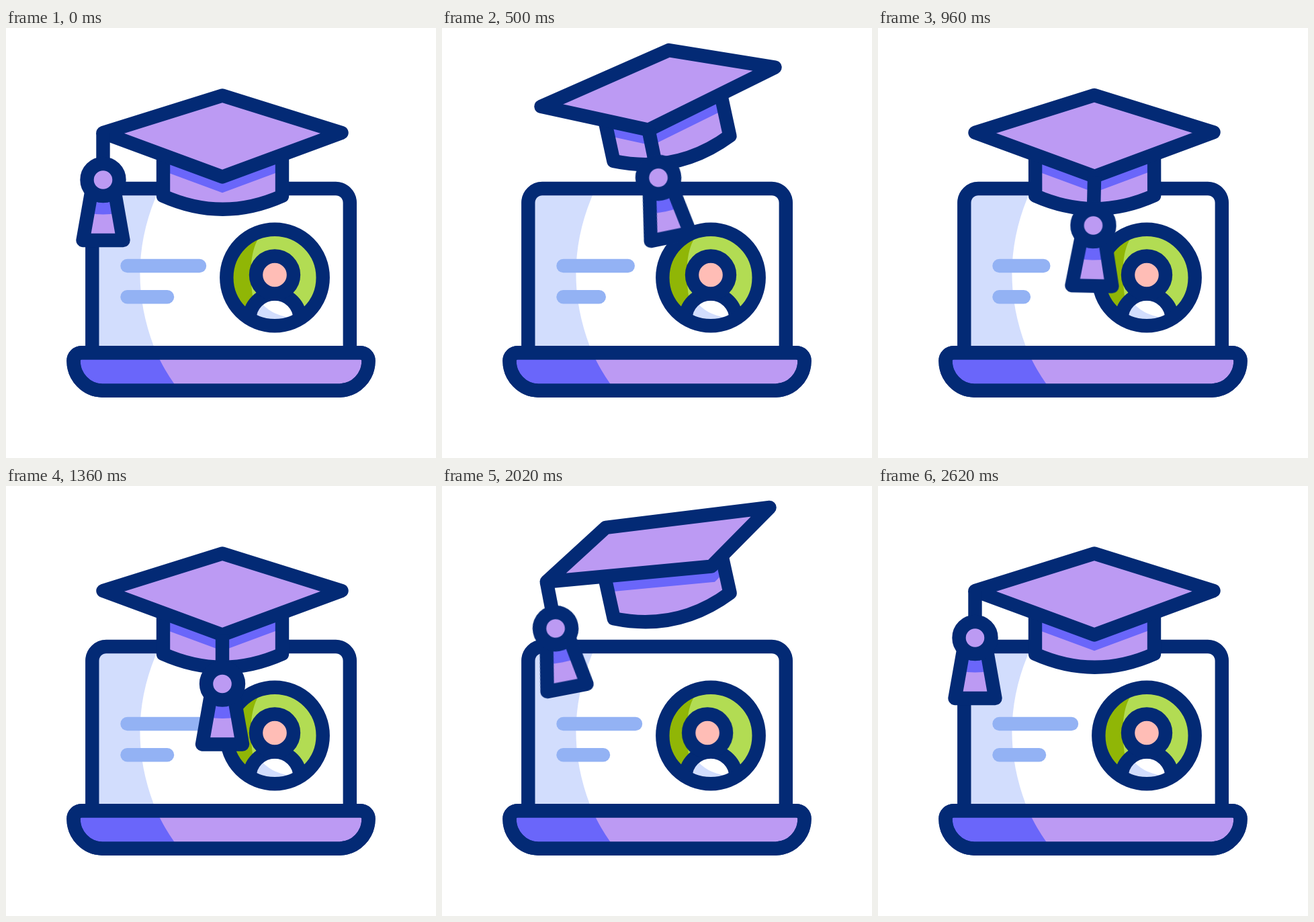
These frames come from a looping animation (640x640 px, 2800 ms). An HTML page:

```html
<!DOCTYPE html>
<html lang="en">
<head>
<meta charset="utf-8">
<title>Online graduation</title>
<style>
  html, body { margin: 0; width: 100%; height: 100%; overflow: hidden; background: #fff; }
  svg { display: block; width: 100vw; height: 100vh; }
  .ink { stroke: #032a75; stroke-width: 20.4; stroke-linejoin: round; }
  .none { fill: none; }
  .lilac { fill: #bc9af3; }
  .violet { fill: #6a66fa; }
  .pale { fill: #d2ddfd; }
  .text, .spark { fill: none; stroke-width: 20.4; stroke-linecap: round; }
  .text { stroke: #93b2f4; stroke-dasharray: 100 300; animation: type 2.8s cubic-bezier(.37, 0, .63, 1) infinite; }
  .spark { stroke: #ffc94f; stroke-dasharray: 100 300; animation: spark 2.8s infinite; }
  .head { animation: shake 2.8s cubic-bezier(.37, 0, .63, 1) infinite; }
  @keyframes type {
    0%, 21.43%, 42.86%, 100% { stroke-dashoffset: 0; }
    10.71%, 32.14% { stroke-dashoffset: 43; }
  }
  @keyframes spark {
    0%, 7.14% { stroke-dashoffset: 100; opacity: 0; }
    7.15% { stroke-dashoffset: 100; opacity: 1; }
    11.43%, 12.86% { stroke-dashoffset: 0; opacity: 1; }
    17.85% { stroke-dashoffset: -100; opacity: 1; }
    17.86%, 100% { stroke-dashoffset: -100; opacity: 0; }
  }
  @keyframes shake {
    0%, 57.86%, 92.86%, 100% { transform: translateX(0); }
    71.43% { transform: translateX(-5px); }
    82.86% { transform: translateX(5px); }
  }
</style>
</head>
<body>
<svg viewBox="0 0 640 640">
  <defs>
    <path id="capBody" d="M-88 15V91.5Q.5 131 89 91.5V15"/>
    <path id="bust" d="M362.5 446V433a37.5 37.5 0 0 1 75 0V446Z"/>
    <clipPath id="inCap"><use href="#capBody"/></clipPath>
    <clipPath id="inBust"><use href="#bust"/></clipPath>
    <clipPath id="inRing"><circle cx="400" cy="371.5" r="72"/></clipPath>
  </defs>

  <!-- laptop -->
  <path class="pale" d="M130 240H228L224 249Q177 360 220 474L224 484H130Z"/>
  <path class="ink none" d="M128.3 483V260a21 21 0 0 1 21-21H490.800a21 21 0 0 1 21 21V483"/>
  <path id="base" class="lilac" d="M112.500 483.300H527.500a12 12 0 0 1 12 12A43.500 44.300 0 0 1 497 539.600H143A43.500 44.300 0 0 1 100.500 495.300a12 12 0 0 1 12-12Z"/>
  <path class="violet" d="M112.500 484H224L229 494Q238 512 250 529L257 539H143A43 44 0 0 1 101 495Z"/>
  <use href="#base" class="ink" style="fill-opacity:0"/>
  <path class="ink none" d="M112.500 483.300H527.500a12 12 0 0 1 12 12A43.500 44.300 0 0 1 497 539.600H143A43.500 44.300 0 0 1 100.500 495.300a12 12 0 0 1 12-12Z"/>
  <path class="text" pathLength="100" d="M180.500 354H288"/>
  <path class="text" pathLength="100" d="M180.500 400.300H240"/>

  <!-- profile -->
  <g clip-path="url(#inRing)">
    <circle cx="400" cy="371.5" r="72" fill="#b2dc53"/>
    <path fill="#90b606" d="M320 300H380L374 316Q354 355 376 445H320Z"/>
    <use href="#bust" fill="#fff"/>
    <path class="pale" clip-path="url(#inBust)" d="M377 405Q392 427 424 431V450H360V405Z"/>
    <use href="#bust" class="ink none"/>
  </g>
  <circle class="ink none" cx="400" cy="371.5" r="71.700"/>
  <circle class="ink head" cx="400" cy="367.500" r="28" fill="#ffbdb6"/>

  <path class="spark" pathLength="100" d="M515.500 66L537.500 38"/>
  <path class="spark" pathLength="100" d="M522 101.500L559 96"/>
  <path class="spark" pathLength="100" d="M525.500 137.500L555.500 158.500"/>

  <!-- cap -->
  <g id="cap">
    <use href="#capBody" class="lilac"/>
    <g clip-path="url(#inCap)"><polygon id="shade" class="violet" transform="translate(0 23.700)"/></g>
    <use href="#capBody" class="ink none"/>
    <polygon id="board" class="ink lilac"/>
  </g>
  <g id="tassel">
    <path id="cord" class="ink none"/>
    <g id="tuft">
      <path class="lilac" d="M-18 22L-30 90H30L18 22Z"/>
      <path class="violet" d="M-18 22L-22.600 49Q0 54 22.600 49L18 22Z"/>
      <path class="ink none" d="M-18 22L-30 90H30L18 22Z"/>
      <circle class="ink lilac" r="24"/>
    </g>
  </g>
</svg>
<script>
const LOOP = 2800, BACK = 1600, PIVOT = { x: 322, y: 158.5 };
const $ = id => document.getElementById(id);
const clamp = u => Math.min(1, Math.max(0, u));
const ease = u => (u = clamp(u), u * u * (3 - 2 * u));

// Eased interpolation through [time, value] keys.
function track(t, keys) {
  const i = keys.findIndex(k => k[0] > t);
  if (i < 0) return keys[keys.length - 1][1];
  const [t0, v0] = keys[i - 1], [t1, v1] = keys[i];
  return v0 + (v1 - v0) * ease((t - t0) / (t1 - t0));
}

const swingOut = [[0, 0], [180, 8], [560, -13], [880, 2], [1080, 0]];
const swingBack = [[0, 0], [340, -16.5], [600, 8.3], [1000, 0]];

// Height of the hop, 0 to 1: even rise, softer landing.
const hop = t => t < 460
  ? ease(t / 460)
  : 1 - ease(1 - (1 - clamp((t - 460) / 620)) ** 1.8);

// Corners of the board turned by angle a; the first one holds the tassel.
function corners(a) {
  const bend = Math.sin(2 * a), tip = 2.5 * Math.cos(2 * a);
  const w = 177.5 * (1 + .17 * bend ** 3), h = 60.5 * (1 - .28 * bend);
  const c = Math.cos(a), s = Math.sin(a);
  return [
    [-w * c, h * s - tip],
    [w * s, h * c + tip],
    [w * c, -h * s - tip],
    [-w * s, -h * c + tip]
  ];
}

function draw(t) {
  const back = t >= BACK, s = back ? t - BACK : t;
  const lift = hop(s), turn = ease(s / 620);
  const yaw = back ? 1 - turn : turn;
  const tilt = -12.7 * lift, y = PIVOT.y - 71 * lift;
  const pts = corners(yaw * Math.PI / 2);

  $('board').setAttribute('points', pts.join(' '));
  $('shade').setAttribute('points', pts.join(' '));
  $('cap').setAttribute('transform', `translate(${PIVOT.x} ${y}) rotate(${tilt})`);

  const r = tilt * Math.PI / 180, [px, py] = pts[0];
  const tx = PIVOT.x + px * Math.cos(r) - py * Math.sin(r);
  const ty = y + px * Math.sin(r) + py * Math.cos(r);
  const swing = track(s, back ? swingBack : swingOut);
  const len = 70 + 3 * yaw;
  $('tassel').setAttribute('transform', `translate(${tx} ${ty}) rotate(${swing})`);
  $('cord').setAttribute('d', `M0 0V${len}`);
  $('tuft').setAttribute('transform', `translate(0 ${len})`);
}

let start;
function tick(now) {
  start ??= now;
  draw((now - start) % LOOP);
  requestAnimationFrame(tick);
}
draw(0);
requestAnimationFrame(tick);
</script>
</body>
</html>
```
